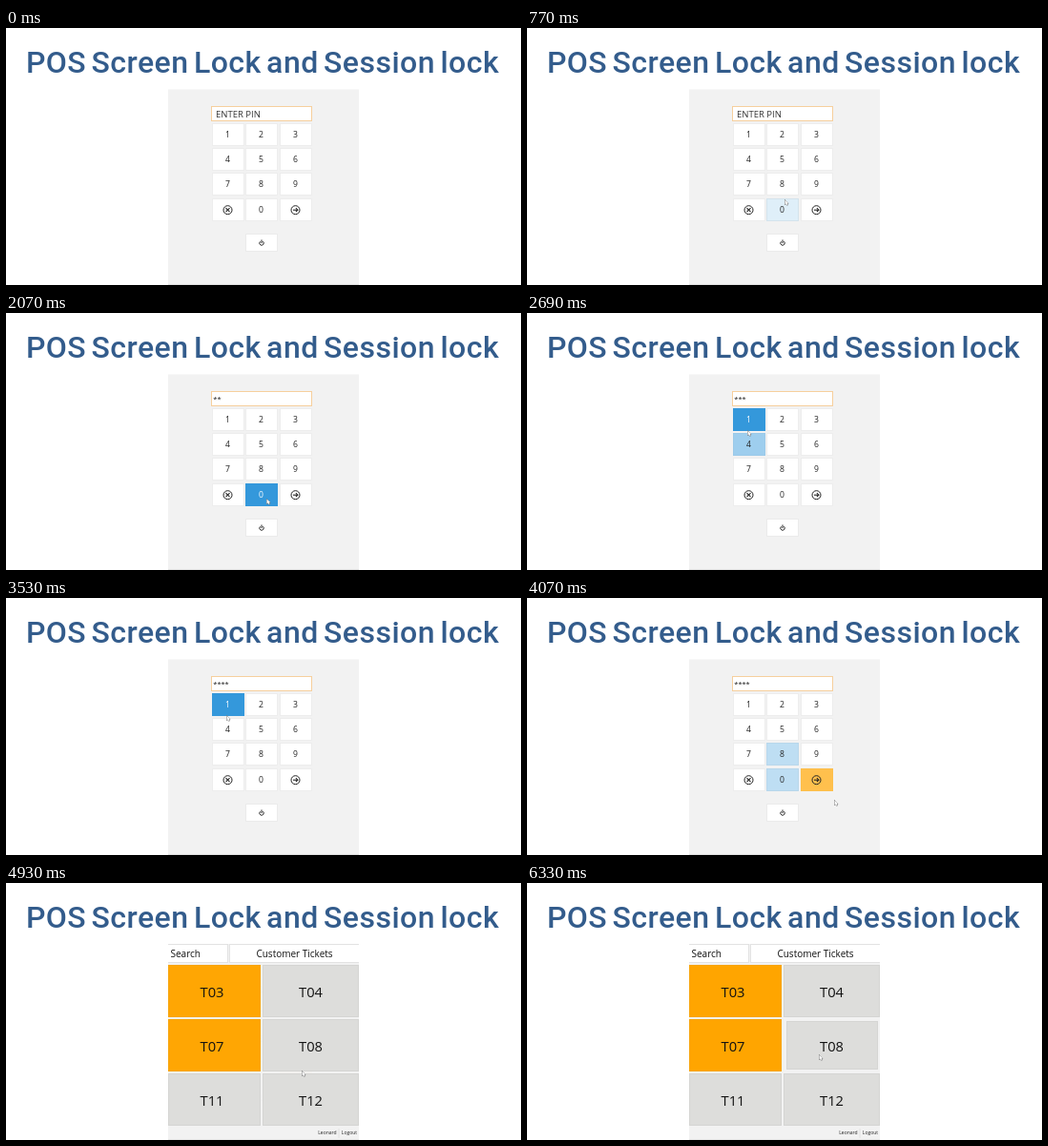
An HTML page with a canvas for the animation above (7.26 s loop, 540 by 270 pixels).

```html
<!DOCTYPE html>
<html lang="en">
<head>
<meta charset="utf-8">
<title>POS Screen Lock and Session lock</title>
<style>
  html, body { margin: 0; width: 100%; height: 100%; overflow: hidden; background: #fff; }
  canvas { display: block; }
</style>
</head>
<body>
<canvas width="540" height="270"></canvas>
<script>
const ctx = document.querySelector('canvas').getContext('2d');
const LOOP = 7260, STEP = 1000 / 13, FADE = 310;
const UI = '"Open Sans", "Noto Sans", sans-serif';
const BLUE = [52, 152, 219], AMBER = [255, 165, 0];
const INK = '#222', PANEL = '#f2f2f2';
const KEYS = ['1', '2', '3', '4', '5', '6', '7', '8', '9', 'clear', '0', 'enter'];

const PRESSES = [1150, 1760, 2610, 3150];
const VISITS = [
  { key: '0', from: 720, to: 2380 },
  { key: '4', from: 2360, to: 2600 },
  { key: '1', from: 2600, to: 3700 },
  { key: '8', from: 3840, to: 4008 },
  { key: '0', from: 3840, to: 4008 },
  { key: 'enter', from: 3860, to: LOOP }
];
const MOVES = [
  { from: 0, to: 540, x: 353, y: 266 },
  { from: 540, to: 770, x: 270, y: 180 },
  { from: 840, to: 1000, x: 273, y: 195 },
  { from: 2380, to: 2610, x: 231, y: 123 },
  { from: 3840, to: 4070, x: 322, y: 212 },
  { from: 4140, to: 4450, x: 310, y: 197 },
  { from: 5700, to: 5930, x: 306, y: 180 }
];

const clamp = v => Math.min(1, Math.max(0, v));
const smooth = v => v * v * (3 - 2 * v);

// A key fades in while pointed at, jumps to full on a press, then fades out.
function highlight(key, t) {
  return Math.max(0, ...VISITS.filter(v => v.key === key).map(({ from, to }) => {
    const end = Math.min(t, to);
    const pressed = PRESSES.some(p => p >= from && p <= end);
    const peak = pressed ? 1 : clamp((end - from) / FADE);
    return t < from ? 0 : peak - (t - end) / FADE;
  }));
}

function box(x, y, w, h, fill, stroke) {
  ctx.fillStyle = fill;
  ctx.fillRect(x, y, w, h);
  if (!stroke) return;
  ctx.strokeStyle = stroke;
  ctx.lineWidth = 1;
  ctx.strokeRect(x + .5, y + .5, w - 1, h - 1);
}

function text(str, x, y, size, color = INK, align = 'center', font = UI) {
  ctx.font = `${size} ${font}`;
  ctx.fillStyle = color;
  ctx.textAlign = align;
  ctx.fillText(str, x, y);
}

function line(points, width = 1, color = INK, close = false) {
  ctx.beginPath();
  points.forEach(([x, y]) => ctx.lineTo(x, y));
  if (close) ctx.closePath();
  ctx.strokeStyle = color;
  ctx.lineWidth = width;
  ctx.stroke();
}

function arc(x, y, r, from = 0, to = 2 * Math.PI) {
  ctx.beginPath();
  ctx.arc(x, y, r, from, to);
  ctx.strokeStyle = INK;
  ctx.lineWidth = 1;
  ctx.stroke();
}

function icon(name, x, y) {
  arc(x, y, 4.5);
  if (name === 'clear') {
    line([[x - 2, y - 2], [x + 2, y + 2]], 1.1);
    line([[x - 2, y + 2], [x + 2, y - 2]], 1.1);
  } else {
    line([[x - 2.5, y], [x + 2.2, y]], 1.1);
    line([[x + .4, y - 2], [x + 2.4, y], [x + .4, y + 2]], 1.1);
  }
}

function keypad(t) {
  box(170, 64.5, 200, 206, PANEL);
  box(170, 269, 200, 1, '#e4e4e4');
  box(215, 82, 106, 16, '#fff', '#f6cf9d');
  const stars = PRESSES.filter(p => t >= p).length;
  if (stars) text('*'.repeat(stars), 217.3, 92.8, '7.4px', INK, 'left');
  else text('ENTER PIN', 220, 94.3, '9.5px', '#333', 'left');

  KEYS.forEach((key, i) => {
    const x = Math.round(215.6 + 35.7 * (i % 3));
    const y = Math.round(99.6 + 26.4 * Math.floor(i / 3));
    const amount = highlight(key, t);
    const tint = (key === 'enter' ? AMBER : BLUE).map(c => Math.round(255 + (c - 255) * amount));
    box(x, y, 34, 24, `rgb(${tint})`, `rgba(0,0,0,${.07 * (1 - amount) ** 2})`);
    if (key.length > 1) icon(key, x + 16.5, y + 12.2);
    else text(key, x + 16.5, y + 15.3, '500 8.6px', amount > .6 ? '#fff' : INK);
  });

  box(251, 216, 34, 19, '#fff', '#ebebeb');
  arc(268, 226, 2.2, -.9, Math.PI + .9);
  line([[268, 222.5], [268, 226]]);
}

function tables(t) {
  box(170, 64, 200, 206, PANEL);
  box(168, 64, 65, 20, '#fff', '#e2e2e2');
  box(234, 64, 138, 20, '#fff', '#e2e2e2');
  text('Search', 172.5, 78, '10px', '#111', 'left');
  text('Customer Tickets', 302.5, 78, '10px', '#111');
  ['T03', 'T04', 'T07', 'T08', 'T11', 'T12'].forEach((name, i) => {
    const right = i % 2, y = 86 + 57 * Math.floor(i / 2);
    const x = right ? 269 : 170, w = right ? 101 : 97;
    const inset = name === 'T08' && t >= 5770 ? 2 : 0;
    const orange = name === 'T03' || name === 'T07';
    box(x + 1.5 * inset, y + inset, w - 2.5 * inset, 55 - 2 * inset,
      orange ? '#ffa500' : '#dddddb', orange ? '#f7a408' : '#d5d5d3');
    text(name, right ? 319.5 : 216, y + 33.5, '14.7px', '#111');
  });
  box(170, 269, 200, 1, '#e8e8e8');
  box(348.5, 258, 1, 10, '#e2e2e2');
  text('Leonard', 346.5, 264, '5px', INK, 'right');
  text('Logout', 368, 264, '5px', INK, 'right');
}

function pointer(t) {
  if (t < 540) return;
  let x = 0, y = 0;
  for (const move of MOVES) {
    const k = smooth(clamp((t - move.from) / (move.to - move.from)));
    x += (move.x - x) * k;
    y += (move.y - y) * k;
  }
  const shape = [[0, 0], [0, 5], [1.3, 4], [2.2, 5.8], [3, 5.3], [2.2, 3.7], [3.6, 3.6]];
  line(shape.map(([dx, dy]) => [x + dx + .5, y + dy + .5]), .9, '#666', true);
  ctx.fillStyle = '#fff';
  ctx.fill();
}

function draw(t) {
  box(0, 0, 540, 270, '#fff');
  ctx.letterSpacing = '0.45px';
  ctx.wordSpacing = '-3px';
  text('POS Screen Lock and Session lock', 269, 46.5, '500 32px', '#335c8c', 'center', 'Roboto, sans-serif');
  ctx.letterSpacing = ctx.wordSpacing = '0px';

  ctx.save();
  ctx.beginPath();
  ctx.rect(170, 64, 200, 206);
  ctx.clip();
  const shown = clamp((t - 4540) / (FADE + STEP));
  if (shown < 1) keypad(t);
  ctx.globalAlpha = shown;
  if (shown > 0) tables(t);
  ctx.globalAlpha = 1;
  pointer(t);
  ctx.restore();
}

function tick() {
  const t = performance.now() % LOOP;
  draw(Math.floor((t + 8) / STEP) * STEP);
  requestAnimationFrame(tick);
}
tick();
</script>
</body>
</html>
```
